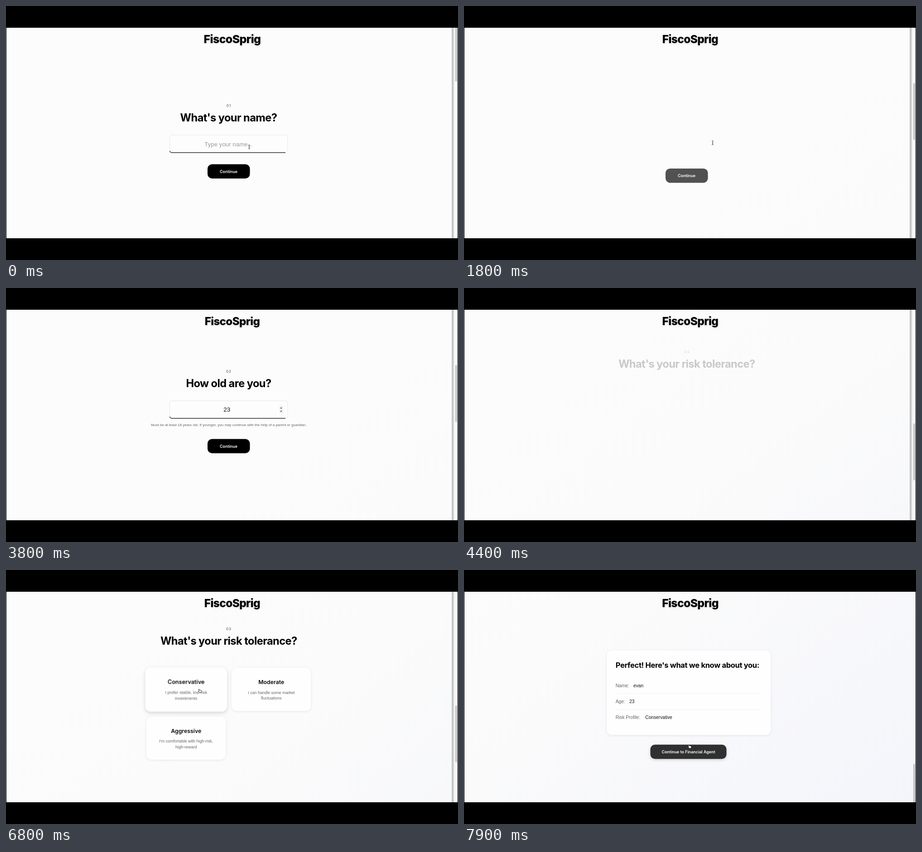
Write an HTML page that moves like this. It is 998 px wide and 561 px high and loops after 8000 ms.

```html
<!DOCTYPE html>
<html lang="en">
<head>
<meta charset="utf-8">
<title>FiscoSprig onboarding</title>
<style>
html, body { margin: 0; width: 100%; height: 100%; overflow: hidden; background: #000; }
body > svg { display: block; width: 100vw; height: 100vh; }

text { font-family: "Liberation Sans", Arial, sans-serif; text-anchor: middle; fill: #666; }
.brand, .head, .sub, .btn, .step { font-family: Inter, Roboto, sans-serif; }
.brand { font-size: 24.5px; font-weight: 800; letter-spacing: -.025em; fill: #000; }
.head { font-size: 23.6px; font-weight: 700; letter-spacing: -.024em; fill: #000; }
.sub { font-size: 12.3px; font-weight: 600; fill: #0a0a0a; }
.btn { font-size: 8.9px; font-weight: 600; fill: #fff; }
.step { font-size: 8px; font-weight: 500; letter-spacing: 1px; fill: #666; }
.hint { font-size: 13.3px; fill: #9a9a9a; }
.typed { font-size: 13.4px; fill: #111; }
.note { font-size: 8.05px; }
.desc { font-size: 9px; }
.row { font-size: 10.2px; text-anchor: start; }
.row .val { fill: #111; }
.summary { font-size: 16.5px; letter-spacing: -.02em; text-anchor: start; }
.panel { fill: #fefefe; }
.card { filter: drop-shadow(0 1px 2.5px rgba(0,0,0,.09)); }
.edge { fill: none; stroke: #e5e7eb; }
.under { fill: none; stroke: #333; stroke-width: 1.5; }

/* every animation shares the 8 s loop */
.a { animation: 8s linear infinite; }
.step-end { animation-timing-function: step-end; }
.ease { animation-timing-function: ease-in-out; }
.out { animation-timing-function: ease-out; }
.mid { transform-box: fill-box; transform-origin: center; }

.pulse { animation-name: pulse; filter: drop-shadow(0 1px 2px rgba(0,0,0,.16)); }
.scroll { animation-name: scroll; }
.thumb { animation-name: thumb; }
.pointer { animation-name: pointer; }
.ibeam { animation-name: ibeam; }
.hand { animation-name: hand; }
.hint1 { animation-name: hint1; }
.hint2 { animation-name: hint2; }
.blip { opacity: 0; animation-name: blip; }
.stay1 { animation-name: stay1; }
.stay2 { animation-name: stay2; }
.in2 { animation-name: in2; }
.btn2 { animation-name: btn2; }
.focus2 { animation-name: focus2; }
.in3 { animation-name: in3; }
.cards3 { animation-name: cards3; }
.in4 { animation-name: in4; }
.liftA { animation-name: liftA; }
.liftB { animation-name: liftB; }
.hover4 { animation-name: hover4; }

@keyframes pulse {
  0%, 31.25%, 62.5%, 93.75% { transform: scale(1.017); }
  15.625%, 46.875%, 78.125% { transform: scale(.983); }
  100% { transform: scale(1.008); }
}
@keyframes scroll {
  0%, 16.25% { transform: translateY(0); }
  21.25%, 50% { transform: translateY(-465px); }
  55%, 86.875% { transform: translateY(-930px); }
  91.875%, 100% { transform: translateY(-1395px); }
}
@keyframes thumb {
  0%, 16.25% { transform: translateY(0); }
  21.25%, 50% { transform: translateY(129px); }
  55%, 86.875% { transform: translateY(258px); }
  91.875%, 100% { transform: translateY(387px); }
}
@keyframes pointer {
  0%, 12.5% { transform: translate(537px, 311px); }
  17.5%, 23.75% { transform: translate(549px, 302px); }
  30%, 55% { transform: translate(484px, 273px); }
  58% { transform: translate(530px, 285px); }
  62.5%, 69% { transform: translate(428px, 267px); }
  74% { transform: translate(562px, 350px); }
  79%, 90% { transform: translate(428px, 267px); }
  97%, 100% { transform: translate(498px, 390px); }
}
@keyframes ibeam {
  0%, 17.5% { opacity: 1; }
  3.1%, 37.5%, 100% { opacity: 0; }
}
@keyframes hand { 0% { opacity: 0; } 56.9%, 100% { opacity: 1; } }
@keyframes hint1 { 0% { opacity: 1; } 3.75%, 100% { opacity: 0; } }
@keyframes hint2 { 0% { opacity: 1; } 39.375%, 100% { opacity: 0; } }
@keyframes blip { 0% { opacity: 1; } 1.875%, 100% { opacity: 0; } }
@keyframes stay1 { 0% { opacity: 0; } 9.375%, 100% { opacity: 1; } }
@keyframes stay2 { 0% { opacity: 0; } 41.25%, 100% { opacity: 1; } }
@keyframes in2 {
  0%, 23% { opacity: 0; transform: translateY(16px); }
  29%, 100% { opacity: 1; transform: none; }
}
@keyframes btn2 {
  0%, 20% { opacity: 0; transform: translateY(40px); }
  22.5% { opacity: .68; transform: translateY(25.5px); }
  28%, 100% { opacity: 1; transform: none; }
}
@keyframes focus2 { 0%, 35% { opacity: 0; } 37.5%, 100% { opacity: 1; } }
@keyframes in3 {
  0%, 54.5% { opacity: 0; transform: translateY(14px); }
  58.5%, 100% { opacity: 1; transform: none; }
}
@keyframes cards3 {
  0%, 56% { opacity: 0; transform: translateY(14px); }
  60.5%, 100% { opacity: 1; transform: none; }
}
@keyframes in4 {
  0%, 90.5% { opacity: 0; transform: translateY(16px); }
  96%, 100% { opacity: 1; transform: none; }
}
@keyframes liftA {
  0%, 80% { transform: none; filter: drop-shadow(0 1px 2.5px rgba(0,0,0,.09)); }
  83.5%, 100% { transform: scale(1.03); filter: drop-shadow(0 3px 4px rgba(0,0,0,.16)); }
}
@keyframes liftB {
  0%, 57.5% { transform: none; filter: drop-shadow(0 1px 2.5px rgba(0,0,0,.09)); }
  60% { transform: scale(1.02); filter: drop-shadow(0 3px 4px rgba(0,0,0,.17)); }
  62.5% { transform: scale(1.007); filter: drop-shadow(0 3px 4px rgba(0,0,0,.15)); }
  65.5%, 100% { transform: none; filter: drop-shadow(0 1px 2.5px rgba(0,0,0,.09)); }
}
@keyframes hover4 {
  0%, 96% { fill: #000; }
  98%, 100% { fill: #303030; }
}
</style>
</head>
<body>
<svg viewBox="0 0 998 561" preserveAspectRatio="none">
  <defs>
    <linearGradient id="sky" gradientUnits="userSpaceOnUse" x1="300" y1="1000" x2="1000" y2="1908">
      <stop offset="0" stop-color="#fcfcfc"/>
      <stop offset=".35" stop-color="#fbfbfb"/>
      <stop offset="1" stop-color="#f4f5fb"/>
    </linearGradient>
    <g id="field">
      <rect class="edge" x="361.5" y="285" width="260.5" height="39" rx="5" style="fill:#fdfdfe"/>
      <path class="under" d="M361.8 320q.4 3.8 4.7 3.8H617q4.300 4.700-3.800"/>
    </g>
    <rect id="button" x="445" width="93.500" height="31.500" rx="10"/>
    <rect id="tile" class="panel" width="175.500" height="95.500" rx="12"/>
  </defs>

  <svg x="1" y="48" width="996" height="465" viewBox="1 48 996 465">
    <g class="a ease scroll">
      <rect x="1" y="48" width="996" height="1860" fill="url(#sky)"/>
      <rect x="984" y="48" width="4.500" height="1395" fill="#c6c6c6"/>
      <rect x="988.500" y="48" width="2" height="1395" fill="#ededed"/>

      <!-- name -->
      <g>
        <text class="step" x="492" y="222.500">01</text>
        <text class="head" x="491.500" y="255">What's your name?</text>
        <use href="#field"/>
        <text class="hint a step-end hint1" x="491.500" y="309.500">Type your name...</text>
        <text class="typed a step-end blip" x="491.500" y="309.500" style="animation-delay:.3s">e</text>
        <text class="typed a step-end blip" x="491.500" y="309.500" style="animation-delay:.45s">ev</text>
        <text class="typed a step-end blip" x="491.500" y="309.500" style="animation-delay:.6s">eva</text>
        <text class="typed a step-end stay1" x="491.500" y="309.500">evan</text>
        <use href="#button" y="349.500"/>
        <text class="btn" x="491.500" y="368.700">Continue</text>
      </g>

      <!-- age -->
      <g transform="translate(0 465)">
        <g class="a out in2">
          <text class="step" x="492" y="186.500">02</text>
          <text class="head" x="491.500" y="218.800">How old are you?</text>
          <path d="M362 285.500q1 2.500 4 2.500H617q3 0 4-2.500" fill="none" stroke="#e2e2e4"/>
          <g class="a focus2"><use href="#field" y="-36"/></g>
          <text class="hint a step-end hint2" x="487.700" y="273.300">Enter your age…</text>
          <text class="typed a step-end blip" x="487.700" y="273.300" style="animation-delay:3.150s">2</text>
          <text class="typed a step-end stay2" x="487.700" y="273.300">23</text>
          <rect x="603.500" y="260" width="8" height="16.500" rx="1" fill="#efefef"/>
          <path d="M605.300 266l2.200-2.600 2.200 2.600zM605.300 271.500l2.200 2.600 2.200-2.600z" fill="#444"/>
          <text class="note" x="491.800" y="304.800">Must be at least 18 years old. If younger, you may continue with the help of a parent or guardian.</text>
        </g>
        <g class="a btn2">
          <use href="#button" y="333.500"/>
          <text class="btn" x="491.500" y="352.700">Continue</text>
        </g>
      </g>

      <!-- risk -->
      <g transform="translate(0 930)">
        <g class="a out in3">
          <text class="step" x="492" y="133">03</text>
          <text class="head" x="491.800" y="164.800">What's your risk tolerance?</text>
        </g>
        <g class="a out cards3">
          <g class="card a ease mid liftA">
            <use href="#tile" x="310" y="216"/>
            <text class="sub" x="397.700" y="252">Conservative</text>
            <text class="desc" x="397.700" y="273.500">I prefer stable, low-risk</text>
            <text class="desc" x="397.700" y="286.300">investments</text>
          </g>
          <g class="card a mid liftB">
            <use href="#tile" x="498" y="216"/>
            <text class="sub" x="585.700" y="252">Moderate</text>
            <text class="desc" x="585.700" y="273.500">I can handle some market</text>
            <text class="desc" x="585.700" y="286.300">fluctuations</text>
          </g>
          <g class="card">
            <use href="#tile" x="310" y="323.500"/>
            <text class="sub" x="397.700" y="359.500">Aggressive</text>
            <text class="desc" x="397.700" y="381">I'm comfortable with high-risk,</text>
            <text class="desc" x="397.700" y="393.800">high-reward</text>
          </g>
        </g>
      </g>

      <!-- summary -->
      <g transform="translate(0 1395)">
        <g class="a out in4">
          <rect class="panel card" x="315" y="177.500" width="362.500" height="187" rx="12"/>
          <text class="head summary" x="334.700" y="216.300">Perfect! Here's what we know about you:</text>
          <path d="M335 273H656M335 308.700H656" stroke="#eeeeef"/>
          <text class="row" y="258.600"><tspan x="334.700">Name:</tspan><tspan class="val" x="374">evan</tspan></text>
          <text class="row" y="294"><tspan x="334.700">Age:</tspan><tspan class="val" x="365">23</tspan></text>
          <text class="row" y="329.300"><tspan x="334.700">Risk Profile:</tspan><tspan class="val" x="400.300">Conservative</tspan></text>
          <g style="filter:drop-shadow(0 2px 3px rgba(0,0,0,.18))">
            <rect class="a hover4" x="411.500" y="385.700" width="168" height="31.500" rx="10"/>
          </g>
          <text class="btn" x="495.500" y="404.800">Continue to Financial Agent</text>
        </g>
      </g>
    </g>

    <rect class="a ease thumb" x="992" y="41" width="4" height="126" rx="2" fill="#c4c4c4"/>
    <text class="brand a ease mid pulse" x="499.500" y="82">FiscoSprig</text>

    <g class="a pointer">
      <path class="a step-end ibeam" d="M-2-4.300Q0-4.300 0-3Q0-4.300 2-4.300M0-3V3.500M-2 4.500Q0 4.500 0 3.300Q0 4.500 2 4.500M-1 .8H1" fill="none" stroke="#333" stroke-width=".9"/>
      <path class="a step-end hand" d="M-2.600-3.700Q-1.800-4.700-1.200-3.600L-.3-1.400Q2.600-2 3.600-.6Q4.300 1 3.300 3.700H-.6Q-1.600 2-3.300.7Q-3.300-.5-1.700.2L-2.700-2.800Z" fill="#fff" stroke="#222" stroke-width=".9"/>
    </g>
  </svg>
</svg>
</body>
</html>
```
